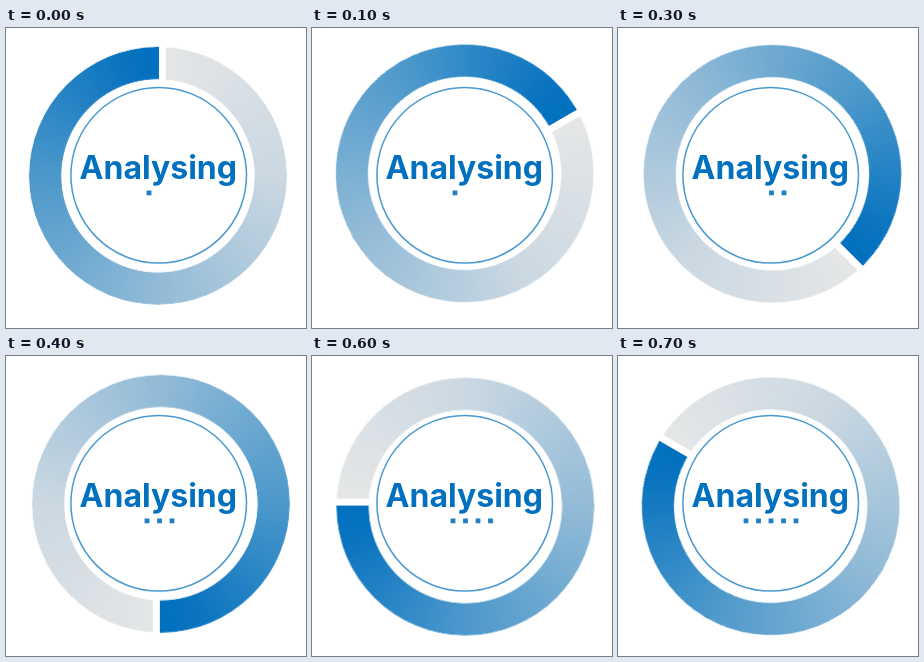
An HTML page that plays this animation: 300x300 px, repeating every 800 ms.

```html
<!DOCTYPE html>
<html lang="en">
<head>
<meta charset="utf-8">
<title>Analysing</title>
<style>
  html, body { margin: 0; width: 100%; height: 100%; overflow: hidden; background: #fff; }
  #stage { position: relative; width: 300px; height: 300px; overflow: hidden; }
  #ring {
    position: absolute; left: -129px; top: -129px; width: 258px; height: 258px;
    border-radius: 50%;
    background: conic-gradient(from 0.5deg, #e6e7e7, #cbd8e2 25%, #92bbd7 50%,
      #4c98cb 75%, #0a74c0 95%, #0070bf);
    -webkit-mask: radial-gradient(circle, transparent 96.3px, #000 97px);
    mask: radial-gradient(circle, transparent 96.3px, #000 97px);
  }
  #ring::after {
    content: ""; position: absolute; left: calc(50% + 0.7px); top: -1px;
    width: 7.6px; height: 36px; background: #fff;
  }
  svg { position: absolute; left: 0; top: 0; }
  text { font: 700 32px Inter, Roboto, sans-serif; fill: #0070bf; text-anchor: middle; }
</style>
</head>
<body>
<div id="stage">
  <div id="ring"></div>
  <svg width="300" height="300" viewBox="0 0 300 300">
    <circle cx="152.7" cy="147.3" r="87.8" fill="none" stroke="#4b9acf" stroke-width="1.5"/>
    <text x="152.3" y="151">Analysing</text>
    <g id="dots" fill="#1f7fc3"></g>
  </svg>
</div>
<script>
  const LOOP = 800, STEPS = 8;
  const angles = [0, 60, 90, 135, 180, 225, 270, 300];
  const dotStarts = [143, 153.5, 141, 141, 128]; // left dot of each row, by row length
  const DOT = 4.8, GAP = 12.5;

  // Plays one style per step, holding each until the next
  function hold(el, style) {
    const frames = Array.from({ length: STEPS + 1 }, (_, i) => ({
      ...style(i % STEPS), offset: i / STEPS, easing: 'steps(1, end)'
    }));
    el.animate(frames, { duration: LOOP, iterations: Infinity }).startTime = 0;
  }

  // The ring wobbles a little as it turns
  hold(document.getElementById('ring'), i => {
    const a = angles[i] * Math.PI / 180;
    const x = 153.4 - 1.5 * Math.cos(a);
    const y = 147.8 - 2.8 * Math.sin(a);
    return { transform: `translate(${x}px, ${y}px) rotate(${angles[i]}deg)` };
  });

  // Rows grow slowly at first, then by one dot per step
  const dotCount = i => Math.max(1 + Math.floor(i / 2), i - 2);

  dotStarts.forEach((start, row) => {
    const path = document.createElementNS('http://www.w3.org/2000/svg', 'path');
    let d = '';
    for (let k = 0; k <= row; k++) {
      d += `M${start + k * GAP - DOT / 2} 162.5h${DOT}v${DOT}h${-DOT}z`;
    }
    path.setAttribute('d', d);
    document.getElementById('dots').append(path);
    hold(path, i => ({ opacity: dotCount(i) === row + 1 ? 1 : 0 }));
  });
</script>
</body>
</html>
```
